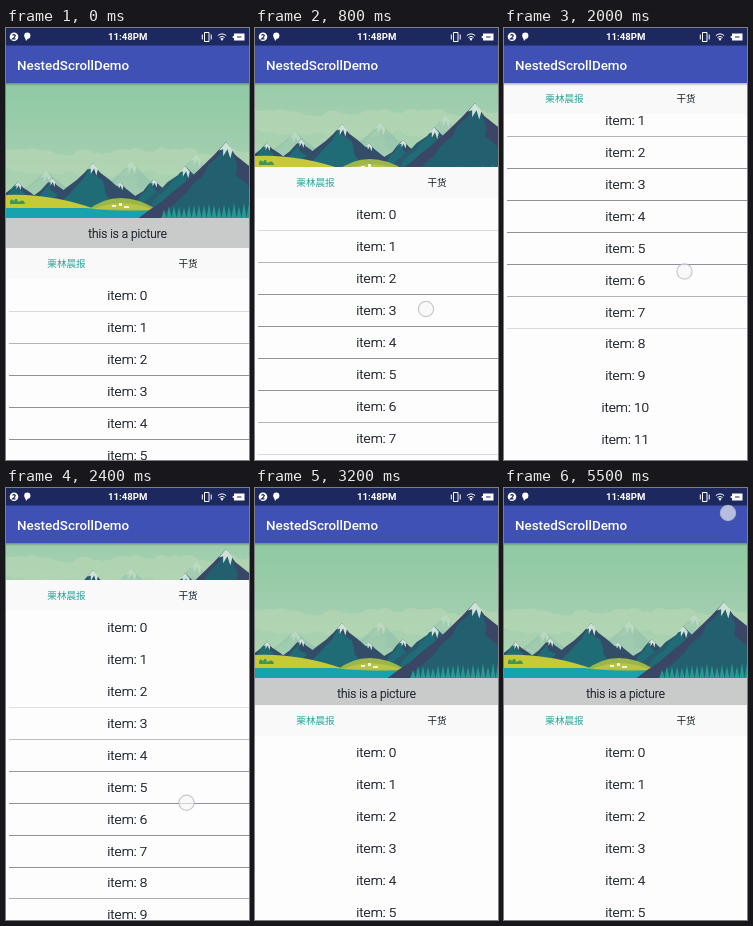
These frames come from a looping animation (243 by 432 pixels, 5700 ms). An HTML page:

```html
<!DOCTYPE html>
<html lang="en">
<head>
<meta charset="utf-8">
<title>NestedScrollDemo</title>
<style>
  html, body { margin: 0; width: 100%; height: 100%; overflow: hidden; background: #fdfdfd; }
  svg { display: block; width: 243px; height: 432px; font-family: Roboto, sans-serif; }
  .mid { text-anchor: middle; }
  .light { font-weight: 300; fill: #060c18; stroke: #060c18; stroke-width: .2; }
  .tab { font: 300 9.6px "Noto Sans CJK SC", "Noto Sans CJK", sans-serif; }
</style>
</head>
<body>
<svg viewBox="0 0 243 432">
  <defs>
    <linearGradient id="sky" x2="0" y2="1">
      <stop offset="0" stop-color="#8fc9a3"/>
      <stop offset=".5" stop-color="#a0ceae"/>
      <stop offset="1" stop-color="#b5d6b4"/>
    </linearGradient>
    <linearGradient id="shade" x2="0" y2="1">
      <stop offset="0" stop-opacity=".28"/>
      <stop offset="1" stop-opacity="0"/>
    </linearGradient>
    <clipPath id="frame"><rect y="-1" width="243" height="136"/></clipPath>
  </defs>
  <rect width="243" height="432" fill="#fdfdfd"/>

  <g id="header">
    <rect y="189" width="243" height="120" fill="#c9cbca"/>
    <text class="mid light" x="121.5" y="210" font-size="11.9">this is a picture</text>
    <g transform="translate(0 55)" clip-path="url(#frame)">
      <rect y="-1" width="243" height="136" fill="url(#sky)"/>
      <g id="clouds" fill="#b4d6b3" opacity=".8"/>
      <g id="far" opacity=".4"/>
      <g id="range"/>
      <path d="M0 112Q45 110 92 127H0Z" fill="#c6ca37"/>
      <path d="M80 128Q112 103 150 126V128Z" fill="#9cb648"/>
      <path d="M88 126Q116 114 148 127Z" fill="#b9c645"/>
      <path d="M4 121q0-7 4-3q3-5 4 1q6-4 7 2Z" fill="#3f9658"/>
      <path d="M0 125H80Q108 129 153 127V136H0Z" fill="#17a3ae"/>
      <path d="M106 122h4v2h-4ZM113 120h3v3h-3ZM118 123h5v2h-5Z" fill="#eef1db"/>
      <g id="near"/>
      <path id="trees" fill="#249a90"/>
    </g>
  </g>

  <g id="list"><rect y="235" width="243" height="800" fill="#fdfdfd"/></g>

  <g id="tabs">
    <rect width="243" height="31" fill="#f9f9f9"/>
    <text class="mid tab" x="60.5" y="19.4" fill="#2aa69a">栗林晨报</text>
    <text class="mid tab" x="182" y="19.4" fill="#101a22">干货</text>
  </g>

  <rect y="55" width="243" height="3" fill="url(#shade)"/>
  <rect y="17" width="243" height="38" fill="#3f51b5"/>
  <text x="11" y="41.6" font-size="13.4" font-weight="500" fill="#fff">NestedScrollDemo</text>

  <rect width="243" height="17.5" fill="#1c285e"/>
  <g fill="#fff">
    <text class="mid" x="121.7" y="12.4" font-size="9.6" font-weight="700">11:48PM</text>
    <circle cx="8" cy="8.7" r="4.3"/>
    <circle cx="21.3" cy="7.7" r="3.1"/>
    <path d="M19 9l1 4 2-2.5Z"/>
    <path d="M214.3 10.6Q216 9.2 217.7 10.6L216 13Z"/>
    <path d="M226 9l2-1.2V5.5h10.5v7H228v-2.3Z"/>
  </g>
  <g fill="none" stroke="#fff">
    <path d="M198.5 4.5h4.5v9h-4.5ZM196.3 6.5v5M205.2 6.5v5"/>
    <path d="M211.8 7.6q4.2-3.4 8.4 0M213.4 9.4q2.6-2 5.2 0"/>
  </g>
  <path d="M6.5 7.4q1.5-1.7 2.8 0q0 1.3-2.8 3.5h3M231 9h4.5" fill="none" stroke="#1c285e" stroke-width="1.2"/>

  <circle id="touch" r="7.6" fill="#f7f7f9" fill-opacity=".65" stroke="#b9bbc2" stroke-opacity=".8" stroke-width="1.2"/>
</svg>

<script>
const LOOP = 5700, STEP = 100;
const TAB_Y = 220, BAR_Y = 55, ROW = 31.93, ROWS = 17, GROUND = 135;
const $ = id => document.getElementById(id);
const [header, list, tabs, touch] = ['header', 'list', 'tabs', 'touch'].map($);
const clamp = (v, lo = 0, hi = 1) => Math.min(hi, Math.max(lo, v));

let seed = 7;
const rnd = () => (seed = seed * 16807 % 2147483647) / 2147483647;

function add(parent, tag, attrs, text = '') {
  const el = document.createElementNS(parent.namespaceURI, tag);
  for (const k in attrs) el.setAttribute(k, attrs[k]);
  el.textContent = text;
  return parent.appendChild(el);
}

// jagged line from a peak down to the ground
function slope(x, y, width, jag) {
  return Array.from({ length: 9 }, (_, i) => {
    const u = i / 8, wobble = i && (rnd() - .5) * jag;
    return `${x + width * u + wobble} ${y + (GROUND - y) * u ** .85}`;
  });
}

function mountain(parent, x, y, width, face, dark) {
  const left = slope(x, y, -width, 3), right = slope(x, y, width, 3);
  const fill = (pts, color) => add(parent, 'path', { d: `M${pts.join('L')}Z`, fill: color });
  fill([...left, ...right.toReversed()], dark);
  fill([...slope(x, y, -width * .75, 4), ...slope(x, y, width * .4, 12).toReversed()], face);
  const s = width / 12;
  add(parent, 'path', {
    d: `M${x} ${y}l${-s} ${s * 1.2} ${s * .6} ${-s * .2} 0 ${s} ${s * .6} ${-s} ${s * .4} ${s * 1.3} ${s * .3} ${-s * 1.2}Z`,
    fill: '#cfe2d8'
  });
}

for (let x = 0; x < 250; x += 13) {
  add($('clouds'), 'ellipse', { cx: x, cy: 76 + 6 * rnd(), rx: 10 + 8 * rnd(), ry: 8 + 6 * rnd() });
}
for (const x of [40, 125, 190]) mountain($('far'), x, 92 - x / 9, 70, '#8fc2ae', '#83b8a8');
for (let x = 12; x < 190; x += 34) mountain($('range'), x, 95 + 4 * rnd(), 46, '#1f6c76', '#334d68');
mountain($('range'), 179, 83, 64, '#1f6c76', '#2b5a6d');
mountain($('range'), 87, 80, 66, '#1f6c76', '#334d68');
mountain($('near'), 220, 59, 86, '#226070', '#3a4666');

let trees = '';
for (let x = 158; x < 245; x += 5) {
  trees += `M${x - 2.5} 135L${x} ${128 - 5 * rnd() - (x - 158) / 20}L${x + 2.5} 135Z`;
}
$('trees').setAttribute('d', trees);

const rules = Array.from({ length: ROWS }, (_, i) => {
  const y = Math.round(268 + i * ROW);
  add(list, 'text', { class: 'mid light', x: 121.3, y: y + 4.2, 'font-size': 13.6 }, `item: ${i}`);
  return add(list, 'rect', { x: 3, y: y + 15, width: 240, height: 1, fill: '#8d9198' });
});

// drag up at a steady speed, then back down; the list settles slightly lower
const rest = t => t < 2000 ? 0 : 3;
const scrollAt = t => Math.max(rest(t), Math.min(.181 * (t - 353), 3 + .198 * (3031 - t)));
const shiftAt = t => Math.max(0, .455 * (scrollAt(t + 40) - 3));

function touchAt(t) {
  if (t >= 5500) return [224, 25, 1];
  const up = 281 - .2075 * (t - 800), down = 243.5 + .178 * (t - 2000);
  const x = up > down ? Math.min(188, 171 + .0425 * (t - 800)) : 180.5;
  return [x, Math.max(up, down), t < 300 ? 0 : clamp((3000 - t) / 200)];
}

const move = (el, x, y) => el.setAttribute('transform', `translate(${x} ${y})`);

function draw(now) {
  const t = Math.floor(now % LOOP / STEP) * STEP;
  const scroll = Math.round(scrollAt(t)), [x, y, alpha] = touchAt(t);

  move(header, 0, -Math.round(shiftAt(t)));
  move(list, 0, -scroll);
  move(tabs, 0, Math.max(BAR_Y, TAB_Y - scroll));
  move(touch, x, y);
  touch.setAttribute('opacity', alpha);

  // hairlines show only in a band of rows that slides away downwards
  const band = 3.5 + Math.max(0, t - 2000) / 180;
  rules.forEach((r, i) => r.setAttribute('opacity', clamp((4.5 - Math.abs(i - band)) / 3)));
  requestAnimationFrame(draw);
}
draw(performance.now());
</script>
</body>
</html>
```
